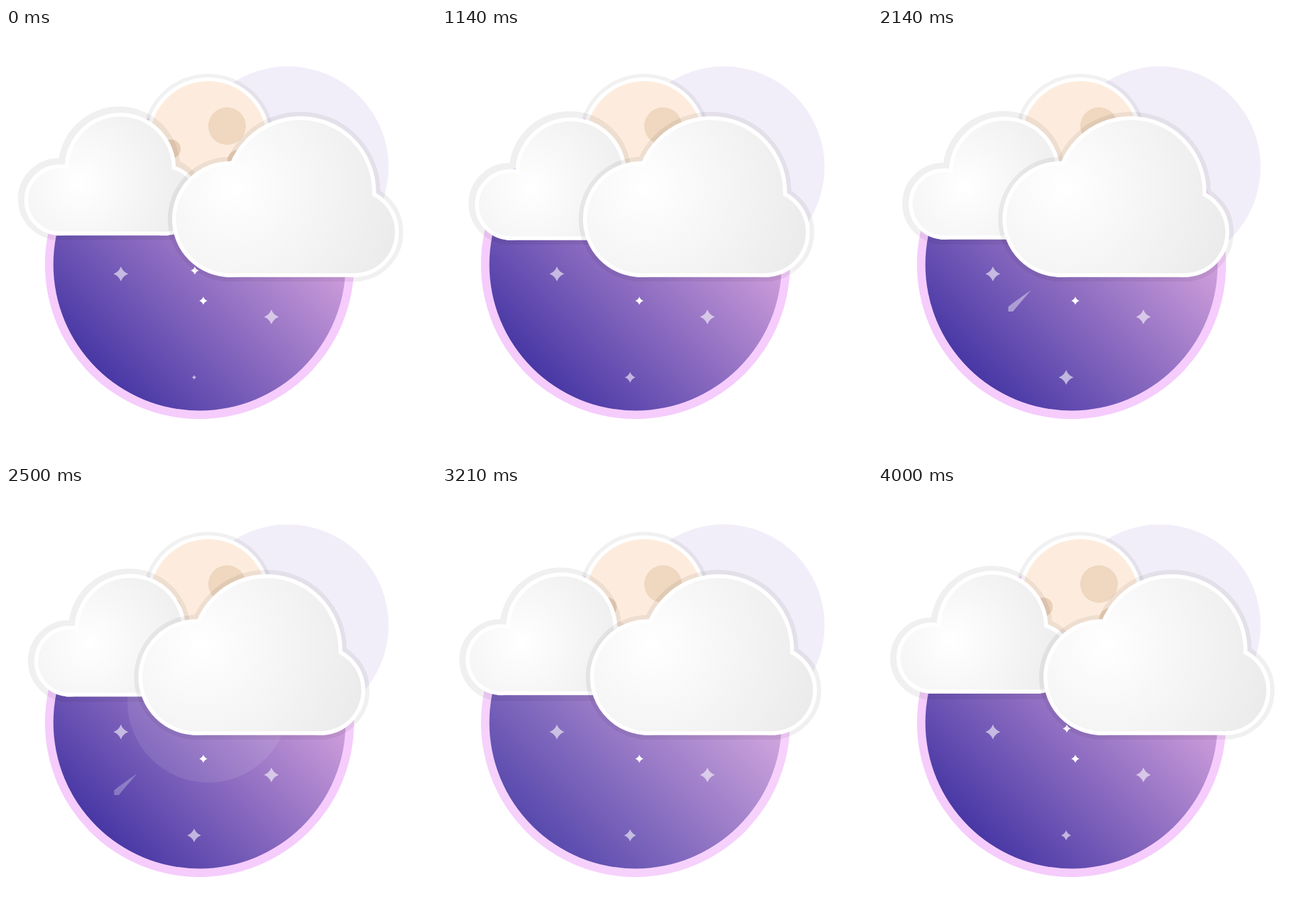
Recreate the animation shown at these times as an HTML page. Size 640x640 px, loop 4070 ms.

```html
<!DOCTYPE html>
<html lang="en">
<head>
<meta charset="utf-8">
<title>Night clouds</title>
<style>
html, body { margin: 0; width: 100%; height: 100%; overflow: hidden; background: #fff; }
svg { display: block; width: 640px; height: 640px; }
.shadow { fill: #000; stroke: #000; opacity: .055; }
.rim { fill: #fff; stroke: #fff; stroke-width: 11.6; }
</style>
</head>
<body>
<svg viewBox="0 0 640 640">
  <defs>
    <linearGradient id="sky" gradientUnits="userSpaceOnUse" x1="135" y1="505" x2="441" y2="199">
      <stop stop-color="#4838a5"/><stop offset="1" stop-color="#e7b1e5"/>
    </linearGradient>
    <radialGradient id="leftFill" gradientUnits="userSpaceOnUse" cx="110" cy="230" r="180">
      <stop stop-color="#fff"/><stop offset="1" stop-color="#ebebeb"/>
    </radialGradient>
    <radialGradient id="rightFill" gradientUnits="userSpaceOnUse" cx="340" cy="237" r="250">
      <stop stop-color="#fff"/><stop offset="1" stop-color="#ebebeb"/>
    </radialGradient>
    <clipPath id="disc"><circle cx="288" cy="352" r="230"/></clipPath>
    <path id="star" d="M0-11Q3-3 11 0Q3 3 0 11Q-3 3-11 0Q-3-3 0-11z"/>
    <g id="leftShape">
      <circle cx="80" cy="256" r="47"/><circle cx="170" cy="209" r="77"/>
      <circle cx="236" cy="256" r="47"/><path d="M80 230H236V303H80z"/>
    </g>
    <g id="rightShape">
      <circle cx="333.5" cy="284.5" r="80.5"/><circle cx="438" cy="244" r="107"/>
      <circle cx="518" cy="304" r="61"/><path d="M333.5 244H518V365H333.5z"/>
    </g>
  </defs>

  <circle cx="419.5" cy="207" r="150" fill="#f2eef9"/>
  <circle cx="288" cy="352" r="230" fill="#f5ccfc"/>
  <circle cx="288" cy="352" r="217.5" fill="url(#sky)"/>
  <g clip-path="url(#disc)"><circle id="pulse" cx="301" cy="321" fill="#fff"/></g>

  <g fill="#fff">
    <use href="#star" transform="translate(171 366)" opacity=".58"/>
    <use href="#star" transform="translate(395 430)" opacity=".58"/>
    <use href="#star" id="twinkle" opacity=".58"/>
    <use href="#star" transform="translate(293.7 406) scale(.55)"/>
    <use href="#star" transform="translate(281 361) scale(.55)"/>
    <path id="meteor" d="M0 0V-7L6-12L34-32L11-5L7 0z"/>
  </g>

  <circle cx="301" cy="166" r="98" opacity=".055"/>
  <circle cx="301" cy="166" r="92.5" fill="#fff"/>
  <circle cx="301" cy="166" r="87" fill="#fdecdd"/>
  <circle cx="329" cy="146" r="28" fill="#efd7c0"/>
  <g fill="#e9cfb7"><circle cx="246" cy="180" r="14"/><circle cx="347" cy="199" r="18"/></g>

  <g id="left">
    <use href="#leftShape" id="leftShadow" class="shadow" stroke-width="27.5"/>
    <use href="#leftShape" class="rim"/>
    <use href="#leftShape" fill="url(#leftFill)"/>
  </g>
  <g id="right">
    <use href="#rightShape" class="shadow" stroke-width="24.5"/>
    <use href="#rightShape" class="rim"/>
    <use href="#rightShape" fill="url(#rightFill)"/>
  </g>
</svg>
<script>
const LOOP = 4070;
const el = id => document.getElementById(id);
const set = (id, name, value) => el(id).setAttribute(name, value);
const move = (id, x, y, scale = 1) => set(id, 'transform', `translate(${x} ${y}) scale(${scale})`);
const clamp = (v, lo = 0, hi = 1) => Math.min(hi, Math.max(lo, v));
// Linear way out until `peak`, linear way back until `end`
const swing = (t, peak, end) => clamp(t < peak ? t / peak : (end - t) / (end - peak));

function draw(t) {
  const drift = 26 * swing(t, 1360, 4030);
  move('left', drift, drift * 7 / 22);
  move('leftShadow', -1.5, clamp((t - 1360) / 900 - 1.5, -1.5, .5));
  move('right', -66 * swing(t, 2017, 4030), 0);

  const size = t < 2000 ? 3.4 + t * .004 : 11.2 - (t - 2000) * .0019;
  move('twinkle', 280, 520, size / 11);

  const flight = t - 1790;
  move('meteor', 226 - flight * .0915, 385 + flight * .1056);
  set('meteor', 'opacity', t < 1100 ? 0 : .55 * clamp(1 - flight / 1400));

  set('pulse', 'r', Math.max(0, (t - 2045) * .264));
  set('pulse', 'opacity', .09 * clamp((3900 - t) / 690));
}

const start = performance.now();
function tick() {
  draw((performance.now() - start) % LOOP);
  requestAnimationFrame(tick);
}
draw(0);
tick();
</script>
</body>
</html>
```
